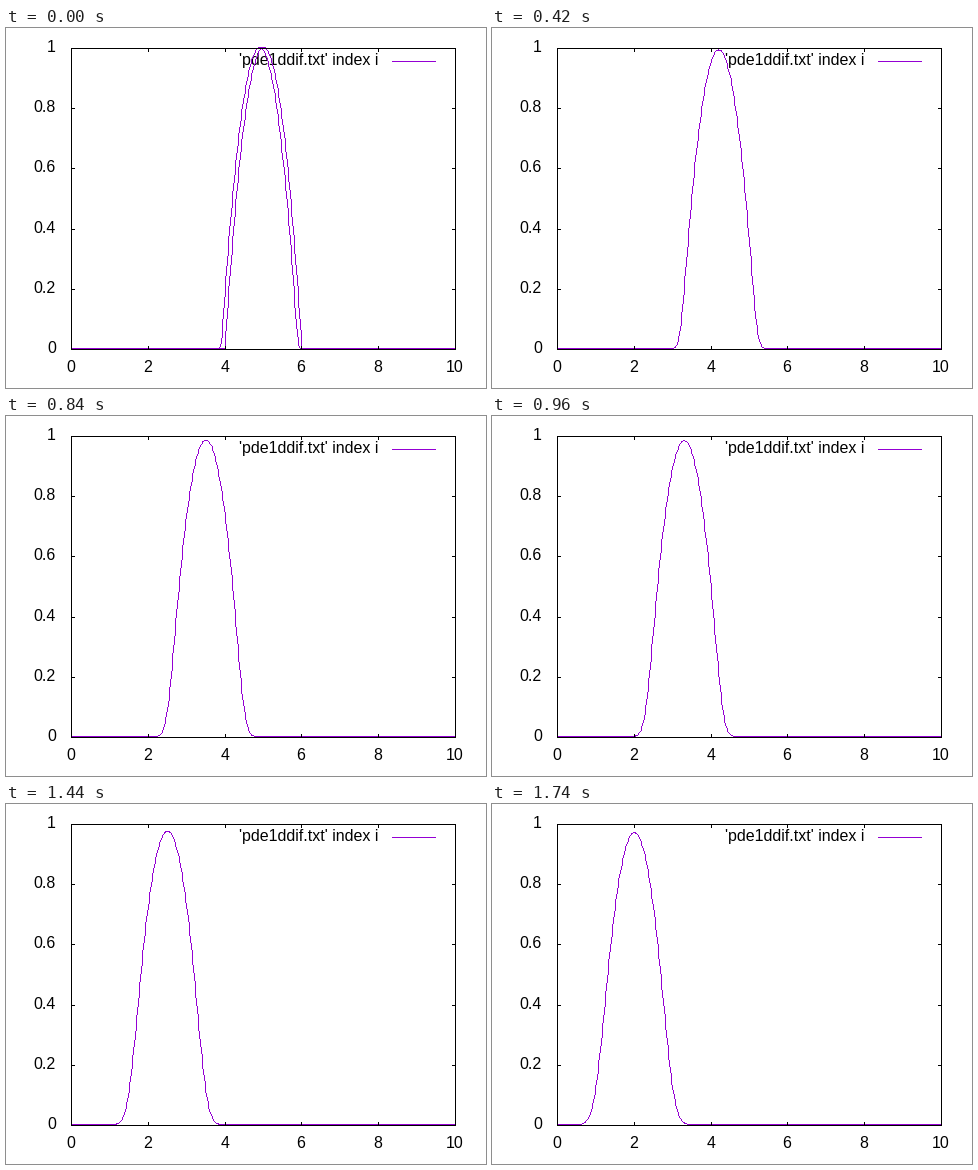
These frames come from a looping animation (480x360 px, 1.8 s). A matplotlib script:

```python
import numpy as np
import matplotlib.pyplot as plt
from matplotlib.animation import FuncAnimation

W, H, DPI = 480, 360, 72
LEFT, RIGHT, TOP, BOTTOM = 65, 449, 20, 321
TICK = 3
PURPLE = "#9400d3"
FRAMES, INTERVAL = 30, 60
SUBSTEPS = 10  # upwind steps between pictures, half a cell each

plt.rcParams.update({
    "font.family": "Liberation Sans",
    "font.size": 16,
    "text.hinting": "default",
    "text.hinting_factor": 8,
})

fig = plt.figure(figsize=(W / DPI, H / DPI), dpi=DPI, facecolor="white")
ax = fig.add_axes([0, 0, 1, 1])
ax.set(xlim=(0, W), ylim=(H, 0))
ax.axis("off")

grid = np.linspace(0, 10, 501)


def to_px(x, u):
    px = LEFT + x * (RIGHT - LEFT) / 10
    py = BOTTOM - u * (BOTTOM - TOP)
    return np.floor(px + 0.5), np.floor(py + 0.5)


def solve(steps):
    """Upwind advection to the left with Courant number 1/2."""
    u = np.clip(1 - (grid - 5) ** 2, 0, None)
    for _ in range(steps * SUBSTEPS):
        u[:-1] = (u[:-1] + u[1:]) / 2
    return u


def trace(u):
    """Pixels of the one-pixel-wide polyline through u."""
    xs, ys = to_px(grid, u)
    px, py = [], []
    for x0, y0, x1, y1 in zip(xs, ys, xs[1:], ys[1:]):
        n = int(max(abs(x1 - x0), abs(y1 - y0))) + 1
        px.append(np.floor(np.linspace(x0, x1, n) + 0.5))
        py.append(np.floor(np.linspace(y0, y1, n) + 0.5))
    return np.concatenate(px), np.concatenate(py)


def segment(x0, y0, x1, y1, color="black"):
    """Crisp horizontal or vertical line including both end pixels."""
    ax.add_patch(plt.Rectangle((x0, y0), x1 - x0 + 1, y1 - y0 + 1,
                               fc=color, lw=0, antialiased=False, zorder=5))


def label(x, y, text, ha):
    ax.text(x, y, text, ha=ha, va="baseline", color="black", zorder=2)


for y in (TOP, BOTTOM):
    segment(LEFT, y, RIGHT, y)
for x in (LEFT, RIGHT):
    segment(x, TOP, x, BOTTOM)

for i in range(6):
    x, y = to_px(2 * i, i / 5)
    segment(x, TOP, x, TOP + TICK)
    segment(x, BOTTOM - TICK, x, BOTTOM)
    segment(LEFT, y, LEFT + TICK, y)
    segment(RIGHT - TICK, y, RIGHT, y)
    label(x, 344, f"{2 * i}", "center")
    label(50, y + 4, f"{i / 5:g}", "right")

label(233, 37, "'pde1ddif.txt' index i", "left")
segment(386, 33, 429, 33, PURPLE)

curve, = ax.plot([], [], ",", color=PURPLE, antialiased=False, zorder=3)


def draw(frame):
    x, y = trace(solve(frame + 1))
    if frame == 0:  # the initial state shares the first picture
        x0, y0 = trace(solve(0))
        x, y = np.append(x0, x), np.append(y0, y)
    curve.set_data(x, y)
    return curve,


anim = FuncAnimation(fig, draw, frames=FRAMES, interval=INTERVAL,
                     repeat=True, repeat_delay=0)
plt.show()
```
